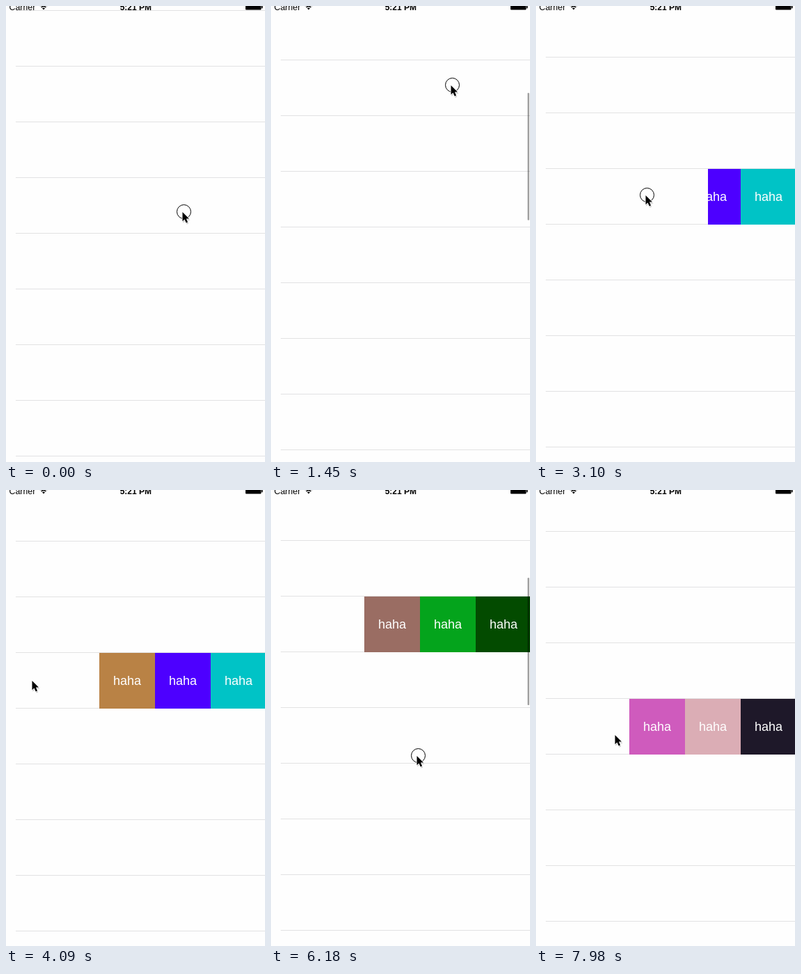
An HTML page for the animation above (8 s loop, 372 by 655 pixels).

```html
<!DOCTYPE html>
<html lang="en">
<head>
<meta charset="utf-8">
<title>Swipe rows</title>
<style>
html, body { margin: 0; width: 100%; height: 100%; overflow: hidden; background: #fefefe; }
#stage { display: block; width: 372px; height: 655px; }
text { font-family: "Liberation Sans", Arial, sans-serif; }
.label { font-size: 18px; fill: #fff; text-anchor: middle; }
</style>
</head>
<body>
<svg id="stage" viewBox="0 0 372 655">
  <rect width="372" height="655" fill="#fefefe"/>
  <g id="lines" fill="#e2e2e3"></g>
  <g id="rows"></g>
  <g id="status">
    <text x="4.5" y="5.5" font-size="12.4">Carrier</text>
    <g transform="translate(54 5.5)">
      <path d="M0 0L-2 -2.2A3 3 0 0 1 2 -2.2Z"/>
      <path d="M-3.4 -3.5A4.9 4.9 0 0 1 3.4 -3.5M-5.4 -5.6A7.8 7.8 0 0 1 5.4 -5.6" fill="none" stroke="#000" stroke-width="1.6"/>
    </g>
    <text x="163.7" y="5.5" font-size="12" font-weight="bold">5:21 PM</text>
    <rect x="344" y="-3" width="22.5" height="8.5" rx="1"/>
    <rect x="367" y="-1" width="1.6" height="4.5" rx=".8"/>
  </g>
  <rect id="bar" x="368.5" width="2.5" height="183" rx="1.2"/>
  <g id="pointer">
    <circle id="ring" r="10" fill="none" stroke="#000"/>
    <g transform="translate(-2 .5) scale(.97)">
      <path d="M.8 1.8V16L4 13L6.2 18L9 17L6.8 12H11.4Z" opacity=".22"/>
      <path d="M0 0V13.6L3.1 10.8L5.4 16L7.8 15L5.6 9.9H9.8Z" stroke="#fff" stroke-width="1.6" paint-order="stroke"/>
    </g>
  </g>
</svg>
<script>
const LOOP = 8000, ROW = 80, WIDTH = 372, RIGHT = 374, FULL = 3 * ROW, SLOP = 12;
const $ = id => document.getElementById(id);

function set(el, attrs) {
  for (const k in attrs) el.setAttribute(k, attrs[k]);
}
function make(tag, attrs, parent) {
  const el = document.createElementNS("http://www.w3.org/2000/svg", tag);
  set(el, attrs);
  return parent.appendChild(el);
}

const clamp = (v, lo, hi) => Math.min(hi, Math.max(lo, v));
const ramp = (t, from, time) => clamp((t - from) / time, 0, 1);
const ease = (t, from, time) => {
  const u = ramp(t, from, time);
  return u * u * (3 - 2 * u);
};

// Where the hand goes: time, x, y.
const stops = [
  [540, 255.5, 295.5], [800, 234.5, 374.5], [950, 233.5, 342.5], [1500, 262.5, 109.5],
  [2070, 275.5, 271.5], [2300, 298.5, 272.5], [2480, 298.5, 272.5], [3100, 159.5, 271.5],
  [3500, 54.5, 272.5], [4150, 39.5, 273.5], [4640, 280.5, 265.5], [4880, 239.5, 198.5],
  [5070, 198.5, 198.5], [5400, 119.5, 200.5], [5950, 211.5, 394.5], [6180, 211.5, 381.5],
  [6350, 213.5, 288.5], [7300, 330.5, 351.5], [7720, 190.5, 352.5], [7940, 115.5, 351.5]
];

// Smooth, never overshooting position on one axis (1 = x, 2 = y).
function hand(t, axis) {
  const last = stops.length - 1;
  t = clamp(t, stops[0][0], stops[last][0]);
  const grad = i => (stops[i + 1][axis] - stops[i][axis]) / (stops[i + 1][0] - stops[i][0]);
  const slope = i => {
    if (i === 0 || i === last) return 0;
    const a = grad(i - 1), b = grad(i);
    return a * b <= 0 ? 0 : 2 * a * b / (a + b);
  };
  let i = 0;
  while (i < last - 1 && t >= stops[i + 1][0]) i++;
  const h = stops[i + 1][0] - stops[i][0], u = (t - stops[i][0]) / h, v = 1 - u;
  return stops[i][axis] * (1 + 2 * u) * v * v + stops[i + 1][axis] * u * u * (3 - 2 * u)
    + h * u * v * (slope(i) * v - slope(i + 1) * u);
}

// Distance a touch has dragged left or up, past the slop.
const pull = (t, { down, up }, axis) =>
  Math.max(0, hand(down, axis) - SLOP - hand(clamp(t, down, up), axis));

const scrolls = [{ down: 800, up: 1500 }, { down: 5950, up: 6350 }];
const taps = [{ down: 0, up: 60 }, { down: 4150, up: 4640 }];
const rows = [
  { index: 6, down: 2480, up: 3500, close: 4200, time: 440, colors: ["#b98245", "#4d00ff", "#00c3c6"] },
  { index: 5, down: 4880, up: 5400, close: 6190, time: 260, colors: ["#9a6d63", "#04a41c", "#034b00"] },
  { index: 8, down: 7300, up: 7720, close: LOOP, time: 1, colors: ["#cf5bbd", "#dbadb5", "#1e1829"] }
];
const touches = [...taps, ...scrolls, ...rows];

for (let i = 0; i < 9; i++) make("rect", { x: 14, y: i * ROW, width: WIDTH - 14, height: 1 }, $("lines"));

for (const row of rows) {
  row.box = make("svg", { height: ROW, overflow: "hidden" }, $("rows"));
  row.inner = make("g", {}, row.box);
  row.colors.forEach((fill, i) => {
    const x = RIGHT - FULL + ROW * i;
    make("rect", { x, width: ROW, height: ROW, fill }, row.inner);
    make("text", { x: x + ROW / 2, y: 46, class: "label" }, row.inner).textContent = "haha";
  });
}

function opened(row, t) {
  const drag = pull(t, row, 1);
  const snap = drag + (FULL - drag) * ease(t, row.up, 210);
  return snap * (1 - ease(t, row.close, row.time));
}

function draw(t) {
  const s = scrolls.reduce((sum, touch) => sum + pull(t, touch, 2), 0);
  const top = Math.round(6 - s);
  set($("lines"), { transform: `translate(0 ${(top % ROW + ROW) % ROW})` });

  for (const row of rows) {
    const edge = Math.round(RIGHT - opened(row, t));
    const width = Math.max(0, WIDTH - edge);
    set(row.box, { x: edge, y: top + ROW * row.index + 1, width, display: width ? "inline" : "none" });
    set(row.inner, { transform: `translate(${-edge} 0)` });
  }

  const shown = Math.max(...scrolls.map(({ down, up }) =>
    ramp(t, down + 110, 40) - ramp(t, up + 500, 150)));
  set($("bar"), { y: 61 + (s - 20) * 0.278, "fill-opacity": 0.37 * shown });

  const [x, y] = [1, 2].map(axis => Math.round(hand(t, axis) - 0.5) + 0.5);
  set($("pointer"), { transform: `translate(${x} ${y})` });
  const down = touches.some(p => t >= p.down && t < p.up);
  set($("ring"), { visibility: down ? "visible" : "hidden" });
}

const start = performance.now();
function tick() {
  draw((performance.now() - start) % LOOP);
  requestAnimationFrame(tick);
}
tick();
</script>
</body>
</html>
```
